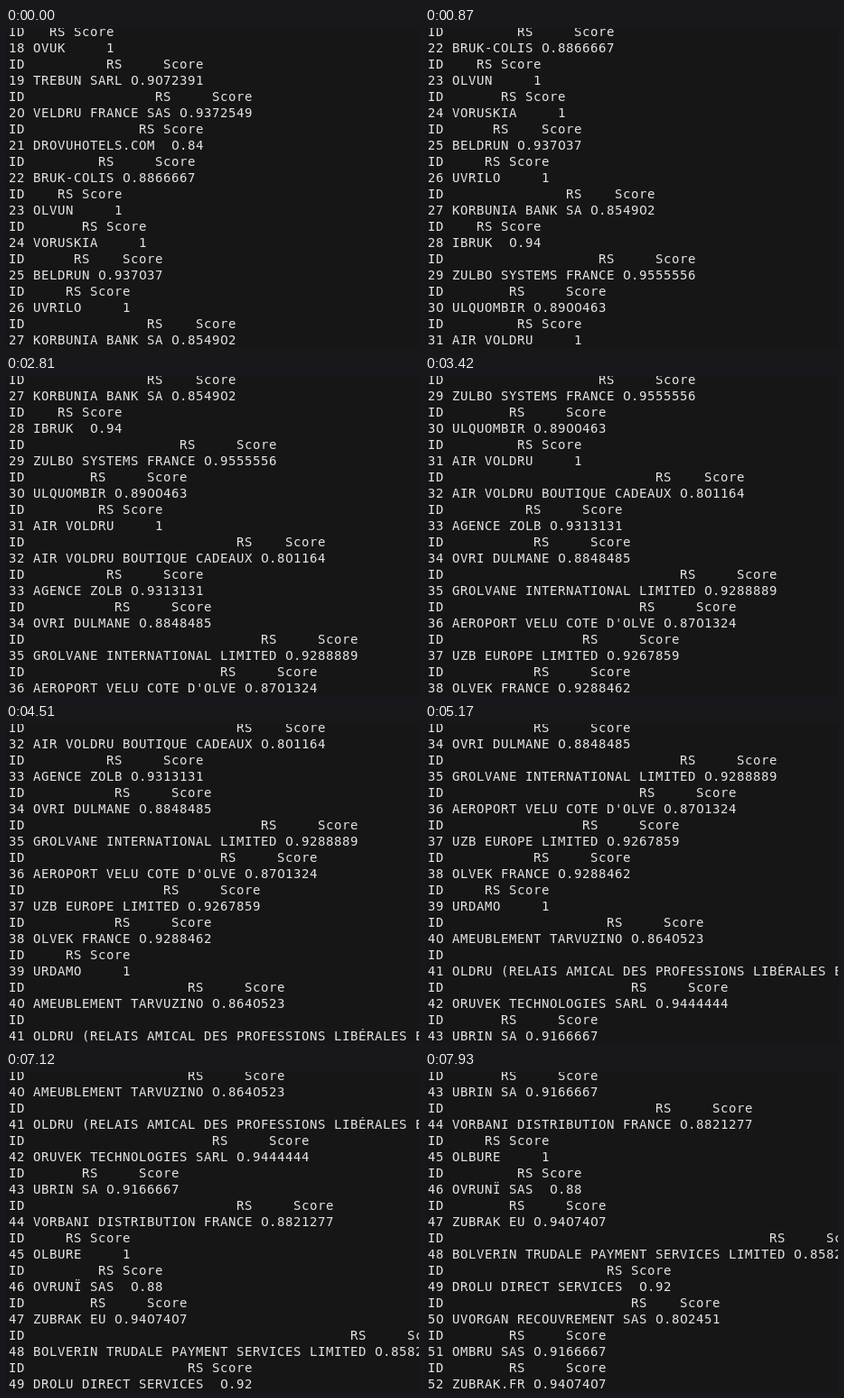
Recreate the animation shown at these times as an HTML page. Size 457 px wide and 355 px high, loop 8 s.

```html
<!DOCTYPE html>
<html lang="fr">
<head>
<meta charset="utf-8">
<title>Scores</title>
<style>
  html, body {
    margin: 0;
    width: 100%;
    height: 100%;
    overflow: hidden;
    background: #161616;
  }
  #stage {
    position: relative;
    width: 457px;
    height: 355px;
    overflow: hidden;
  }
  #log {
    position: absolute;
    left: 3px;
    top: -5px;
    margin: 0;
    color: #e4e4e4;
    font: 14px/18px "DejaVu Sans Mono", monospace;
  }
  /* Every glyph sits in a 9px terminal cell. */
  #log, #log i { letter-spacing: calc(9px - 1ch); }
  /* Plain zero, without the dot. */
  #log i { font: 14px/0 "DejaVu Sans", sans-serif; }
</style>
</head>
<body>
<div id="stage"><pre id="log"></pre></div>
<script>
const FIRST_ID = 18, LINE = 18, DURATION = 8000;

const entries = `OVUK|1
TREBUN SARL|0.9072391
VELDRU FRANCE SAS|0.9372549
DROVUHOTELS.COM|0.84
BRUK-COLIS|0.8866667
OLVUN|1
VORUSKIA|1
BELDRUN|0.937037
UVRILO|1
KORBUNIA BANK SA|0.854902
IBRUK|0.94
ZULBO SYSTEMS FRANCE|0.9555556
ULQUOMBIR|0.8900463
AIR VOLDRU|1
AIR VOLDRU BOUTIQUE CADEAUX|0.801164
AGENCE ZOLB|0.9313131
OVRI DULMANE|0.8848485
GROLVANE INTERNATIONAL LIMITED|0.9288889
AEROPORT VELU COTE D'OLVE|0.8701324
UZB EUROPE LIMITED|0.9267859
OLVEK FRANCE|0.9288462
URDAMO|1
AMEUBLEMENT TARVUZINO|0.8640523
OLDRU (RELAIS AMICAL DES PROFESSIONS LIBÉRALES ET RURALES)|0.8333333
ORUVEK TECHNOLOGIES SARL|0.9444444
UBRIN SA|0.9166667
VORBANI DISTRIBUTION FRANCE|0.8821277
OLBURE|1
OVRUNÏ SAS|0.88
ZUBRAK EU|0.9407407
BOLVERIN TRUDALE PAYMENT SERVICES LIMITED|0.8582011
DROLU DIRECT SERVICES|0.92
UVORGAN RECOUVREMENT SAS|0.802451
OMBRU SAS|0.9166667
ZUBRAK.FR|0.9407407`.split('\n').map(row => row.split('|'));

// Right-aligned columns, one header per record.
const record = ([name, score], i) => {
  const width = Math.max(5, score.length);
  return `ID ${'RS'.padStart(name.length)} ${'Score'.padStart(width)}\n` +
    `${FIRST_ID + i} ${name} ${score.padStart(width)}`;
};

const log = document.getElementById('log');
log.innerHTML = entries.map(record).join('\n').replaceAll('0', '<i>0</i>');

// Times at which the log scrolls; a whole record is two lines.
const scrollTimes = [
  50, 370, 600, 870, 1300, 1580, 2090, 2420, 2810, 3100, 3420, 3590, 3650,
  3950, 4510, 4880, 5170, 5580, 5850, 6050, 6350, 6770, 7120, 7430, 7720, 7930
];
const singleLine = new Set([3590, 3650]);

let lines = 0;
const pose = time => ({
  offset: time / DURATION,
  transform: `translateY(${-lines * LINE}px)`,
  easing: 'steps(1, end)'
});
const steps = [pose(0)];
for (const time of scrollTimes) {
  lines += singleLine.has(time) ? 1 : 2;
  steps.push(pose(time));
}
steps.push(pose(DURATION));

log.animate(steps, { duration: DURATION, iterations: Infinity });
</script>
</body>
</html>
```
